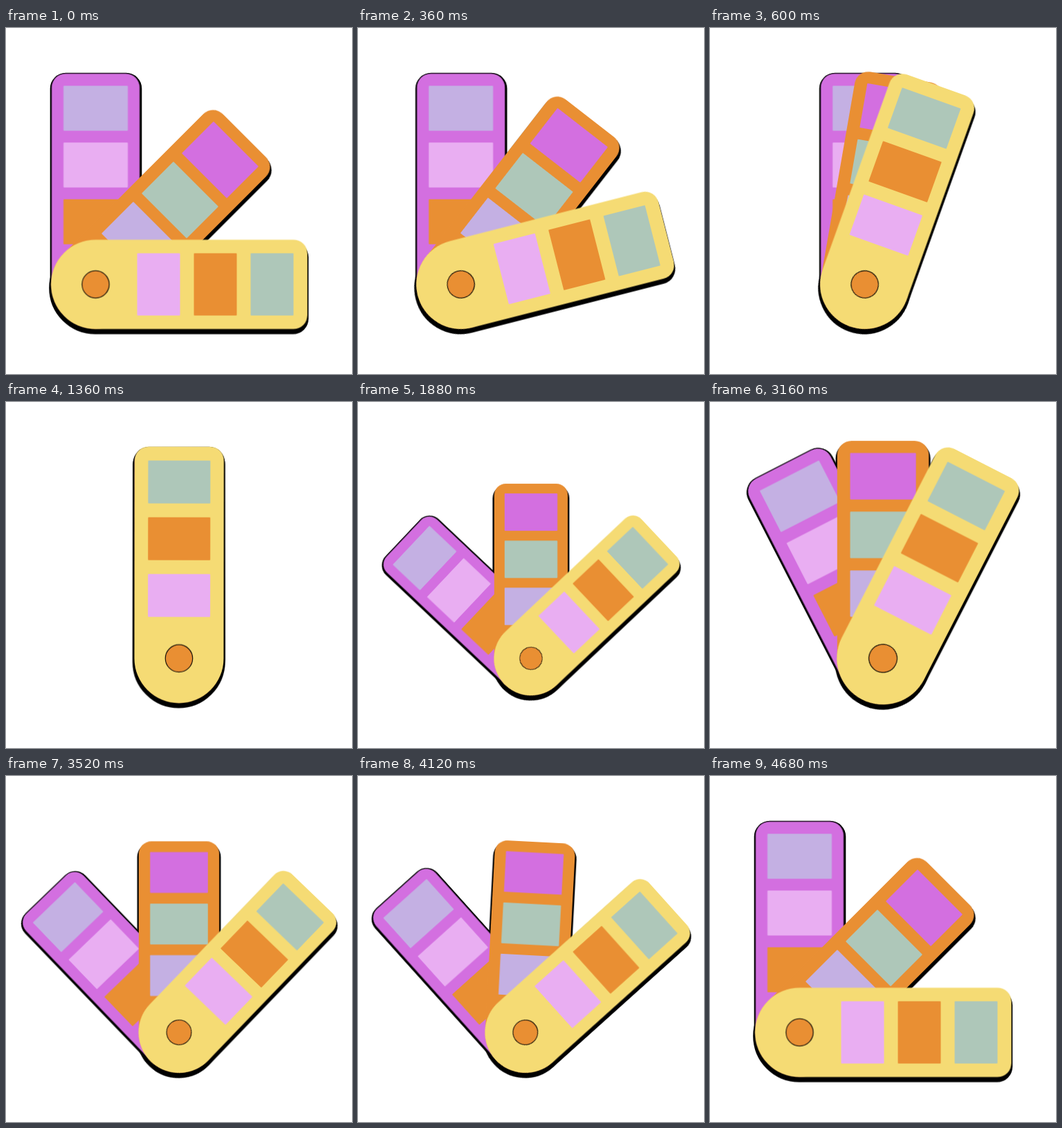
These frames come from a looping animation (500 by 500 pixels, 5 s). An HTML page:

```html
<!DOCTYPE html>
<html lang="en">
<head>
<meta charset="utf-8">
<title>Colour swatch fan</title>
<style>
  html, body { margin: 0; width: 100%; height: 100%; overflow: hidden; background: #fff; }
  svg { display: block; width: 100vw; height: 100vh; }
  .shade { stroke: #000; stroke-linejoin: round; vector-effect: non-scaling-stroke; }
</style>
</head>
<body>
<svg id="stage" viewBox="0 0 500 500"></svg>
<script>
const LOOP = 5000;
const PIVOT_Y = 370.5;
const EASE = 'cubic-bezier(.72, 0, .28, 1)';
const C = {
  purple: '#d36fe0', lilac: '#c4b0e3', pink: '#e9aef2',
  orange: '#e98f33', green: '#aec7b9', yellow: '#f5db74'
};

// Back to front; swatches run from the far end towards the pivot.
const cards = [
  { fill: C.purple, half: 63.5, len: 304.5, swatches: [C.lilac, C.pink, C.orange],
    box: [93, 65, 287], shade: { dx: .5, dy: 1.5, grow: 2.8 } },
  { fill: C.orange, half: 64, len: 304, swatches: [C.purple, C.green, C.lilac],
    box: [92, 65, 287], shade: { dx: 0, dy: 4.5, grow: 2.3 } },
  { fill: C.yellow, half: 64.5, len: 306, swatches: [C.green, C.orange, C.pink],
    box: [90, 62, 286], shade: { dx: -.5, dy: 5.2, grow: 2.2 } }
];

// time, pivot x, scale, angle of each card
const steps = [
  [0,    129.5, 1,    [0, 45, 90]],
  [1000, 250,   1,    [0, 0, 0]],
  [1320, 250,   1,    [0, 0, 0]],
  [2190, 250,   .8,   [-55, 0, 55]],
  [2905, 250,   1.05, [-25, 0, 25]],
  [3720, 250,   .9,   [-45, 0, 45]],
  [3920, 250,   .9,   [-45, 0, 45]],
  [4680, 129.5, 1,    [0, 45, 90]],
  [5000, 129.5, 1,    [0, 45, 90]]
];

const stage = document.getElementById('stage');

function add(parent, tag, attrs = {}) {
  const el = document.createElementNS('http://www.w3.org/2000/svg', tag);
  for (const key in attrs) el.setAttribute(key, attrs[key]);
  return parent.appendChild(el);
}

// Rounded top, half-circle around the pivot at 0,0.
function outline({ half: h, len }, r = 20) {
  return `M${-h} 0V${r - len}a${r} ${r} 0 0 1 ${r} ${-r}H${h - r}` +
    `a${r} ${r} 0 0 1 ${r} ${r}V0A${h} ${h} 0 0 1 ${-h} 0Z`;
}

function play(el, index, dx = 0, dy = 0) {
  const frames = steps.map(([time, x, scale, angles]) => ({
    offset: time / LOOP,
    easing: EASE,
    transform: `translate(${x + dx}px, ${PIVOT_Y + dy}px) rotate(${angles[index]}deg) scale(${scale})`
  }));
  el.animate(frames, { duration: LOOP, iterations: Infinity }).startTime = 0;
}

// All shadows lie behind all cards.
cards.forEach((card, i) => {
  const { dx, dy, grow } = card.shade;
  const path = add(stage, 'path', { d: outline(card), class: 'shade', 'stroke-width': grow * 2 });
  play(path, i, dx, dy);
});

cards.forEach((card, i) => {
  const group = add(stage, 'g');
  const [width, height, top] = card.box;
  add(group, 'path', { d: outline(card), fill: card.fill });
  card.swatches.forEach((fill, n) =>
    add(group, 'rect', { x: -width / 2, y: n * 82 - top, width, height, rx: 1, fill }));
  if (i === cards.length - 1) {
    add(group, 'circle', { r: 19.7, fill: C.orange, stroke: '#1a1208', 'stroke-width': 1.2 });
  }
  play(group, i);
});
</script>
</body>
</html>
```
